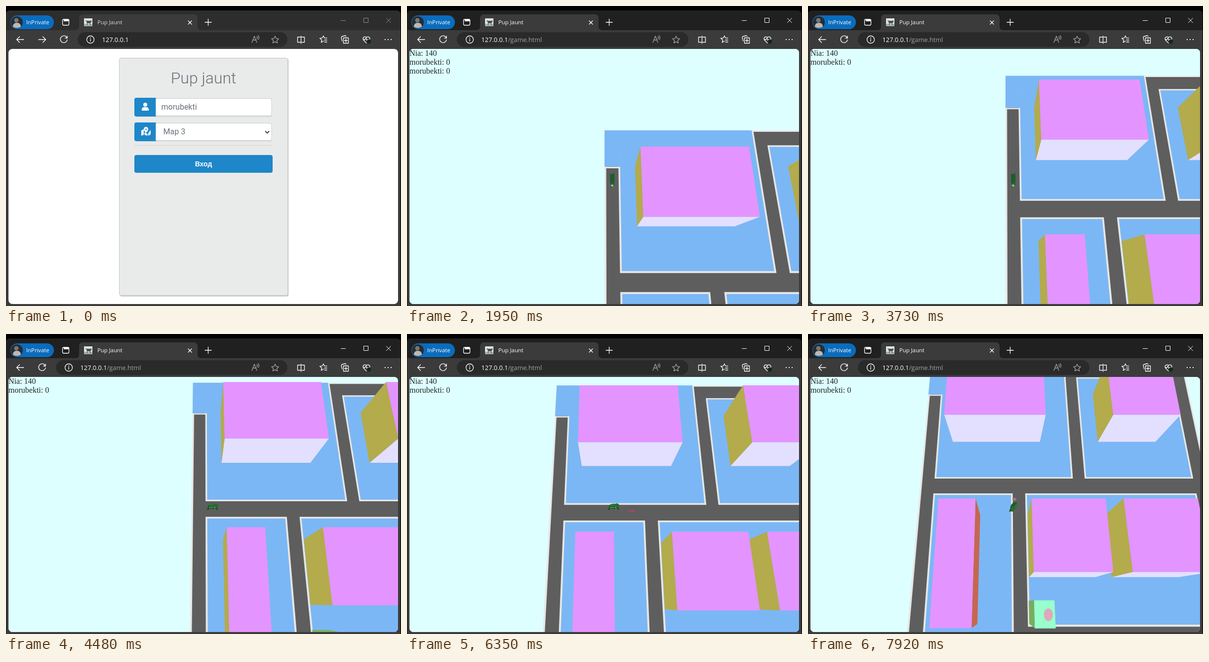
An HTML page with a canvas for the animation above (7.99 s loop, 800 by 608 pixels).

```html
<!DOCTYPE html>
<html lang="en">
<head>
<meta charset="utf-8">
<title>Pup Jaunt</title>
<style>
html, body { margin: 0; width: 100%; height: 100%; overflow: hidden; background: #000; }
#stage { position: relative; width: 800px; height: 608px; overflow: hidden; background: #000; }
svg { position: absolute; left: 0; top: 0; }
#game { position: absolute; left: 5px; top: 87px; border-radius: 8px; }
#score { position: absolute; left: 5px; top: 87px; font: 16px/18px "Liberation Serif", serif; color: #222; }
.ui { font-family: "Open Sans", "Noto Sans", sans-serif; fill: #fff; }
.form { font-family: Roboto, sans-serif; fill: #6a7078; }
.line { fill: none; stroke: #fff; stroke-width: 1.3; stroke-linecap: round; stroke-linejoin: round; }
.dim { stroke: #a3a3a3; }
#frame { fill: #202020; }
#controls { stroke: #fff; stroke-width: 1; fill: none; }
.idle #frame { fill: #2d2d2d; }
.idle #controls { stroke: #8b8b8b; }
.idle #tabText { fill: #dcdcdc; }
#button { fill: #1d87c9; }
.hover #button { fill: #26a9e0; }
</style>
</head>
<body>
<div id="stage">
<svg width="800" height="608" viewBox="0 0 800 608">
  <path id="frame" d="M0 608V17q0-8 8-8H791q8 0 8 8V608Z"/>
  <path d="M1 608V49H140q8 0 8-8V25q0-8 8-8H380q8 0 8 8V41q0 8 8 8H799V608Z" fill="#3b3b3b"/>
  <rect x="9" y="19" width="88" height="28" rx="14" fill="#0a6cbd"/>
  <circle cx="22" cy="33" r="12" fill="#2b2b2b"/>
  <circle cx="21" cy="29" r="4.5" fill="#777"/>
  <path d="M14 42q0-8 8-8t8 8q-8 5-16 0" fill="#b9b9b9"/>
  <text class="ui" x="41" y="37" font-size="11.3">InPrivate</text>
  <rect class="line" x="114.5" y="27" width="13" height="12" rx="2.5"/>
  <path d="M114 27h14v4h-14zM114 31h3v-4h-3z" fill="#fff"/>
  <g id="favicon">
    <rect x="158" y="25" width="17" height="16" fill="#dbe4df"/>
    <path d="M158 36h17v5h-17z" fill="#a5b2a6"/>
    <path d="M161 29l3 1h7l2-1v4l-2 1v5h-1v-4h-5v4h-1v-5z" fill="#49504f"/>
  </g>
  <circle id="spinner" cx="160" cy="35" r="1.5" fill="#3b8fd6"/>
  <text class="ui" id="tabText" x="185" y="37" font-size="11.3"></text>
  <path class="line" stroke-width="1" d="M369 30l7 7m0-7l-7 7M403 33h13m-6.5-6.5v13"/>
  <path id="controls" d="M678 29.5h10M724.5 24.5h9v9h-9zM770 24.5l9.5 9.5m0-9.5l-9.5 9.5"/>

  <path class="line" d="M36 68H21.5m6-6l-6 6 6 6"/>
  <path class="line" id="forward" d="M66 68h14.5m-6-6l6 6-6 6"/>
  <path class="line" id="stop" d="M67.5 62.5l11 11m0-11l-11 11"/>
  <path class="line" id="reload" d="M123.5 64.5a7 7 0 1 0 .5 4M124 61v4h-4"/>
  <rect id="pill" y="53" height="30" rx="15" fill="#2a2a2a"/>
  <g id="site">
    <circle class="line" cx="0" cy="68" r="7.5"/>
    <path class="line" d="M0 67.5v4"/><circle cx="0" cy="64.7" r="1" fill="#fff"/>
    <text class="ui" x="23.5" y="73" font-size="12.8">127.0.0.1<tspan id="path" fill="#a3a3a3">/game.html</tspan></text>
  </g>
  <path class="line dim" d="M498 74l5-13 5 13m-8-5h6M508 62q2 2 0 5M510.5 60q3.5 4 .5 8"/>
  <path class="line dim" d="M545 61l2.2 4.7 5.1.6-3.8 3.5 1 5.1-4.5-2.5-4.5 2.5 1-5.1-3.8-3.5 5.1-.6z"/>
  <path class="line" d="M596 63h-5.5v10.5H596M599 63h5.5v10.5H599M597.5 61v15"/>
  <path class="line" d="M643 71l-4.5 3 1-5-4-3.5 5-.7 2.3-4.3 2.2 4.3h5M645 69h5m-5 4h5"/>
  <path class="line" d="M681 71l-2-7q0-2 2-2.5l6-1.5 2 1.5M683.5 64.5h10v11h-10zM688.5 67v6m-3-3h6"/>
  <path class="line" d="M730 75l-6-6c-3-5 3-9 6-5 3-4 9 0 6 5M724 68h3l2-3 2 5 1-2h3"/>
  <circle cx="735" cy="72" r="4.5" fill="#16281e"/>
  <path d="M767 67h2v2h-2zm6 0h2v2h-2zm6 0h2v2h-2z" fill="#fff"/>

  <rect x="5" y="87" width="789" height="517" rx="8" fill="#fff"/>
  <g id="login">
    <rect x="231" y="107" width="342" height="482" rx="4" fill="#000" opacity=".1"/>
    <rect x="230.5" y="106.5" width="341" height="482" rx="4" fill="#000" opacity=".12"/>
    <rect x="229.5" y="105.5" width="341" height="481" rx="3.5" fill="#e9ebea" stroke="#c3c4c4"/>
    <text class="form" x="400" y="157" font-size="32" font-weight="300" text-anchor="middle">Pup jaunt</text>
    <path d="M264 188h274v37H264zM264 238h274v37H264z" fill="#000" opacity=".06"/>
    <path d="M304 186v38h-40q-4 0-4-4v-30q0-4 4-4zM304 236v38h-40q-4 0-4-4v-30q0-4 4-4z" fill="#1d87c9"/>
    <path d="M303.5 187.5H534q4 0 4 4v27q0 4-4 4H303.5zM303.5 237.5H534q4 0 4 4v27q0 4-4 4H303.5z" fill="#fff" stroke="#c9ccd0"/>
    <circle cx="282" cy="200" r="4" fill="#fff"/>
    <path d="M275 212v-2q0-5 5-5h4q5 0 5 5v2z" fill="#fff"/>
    <path d="M274 252l5-2v11l-5 2zM280.5 256l6 3v4l-6-2zM288 258l5-7v9l-5 3z" fill="#fff"/>
    <path d="M283.5 257q-5-5-4.5-7.5a4.5 4.5 0 0 1 9 0q.5 2.5-4.5 7.5" fill="#fff"/>
    <circle cx="283.5" cy="250" r="1.5" fill="#1d87c9"/>
    <text class="form" x="314.5" y="210" font-size="16">morubekti</text>
    <text class="form" x="318.5" y="260" font-size="16">Map 3</text>
    <path d="M525 253.5l4 4 4-4" fill="none" stroke="#444" stroke-width="2"/>
    <path d="M260 282.5h280" stroke="#d0d2d2"/>
    <rect id="button" x="260" y="302" width="280" height="36" rx="4"/>
    <text x="400" y="325" font-family="Liberation Sans, sans-serif" font-size="14" font-weight="700" fill="#fff" text-anchor="middle">Вход</text>
  </g>
</svg>
<canvas id="game" width="789" height="517"></canvas>
<div id="score"><div>Nia: 140</div><div>morubekti: 0</div><div id="third">morubekti: 0</div></div>
<svg width="800" height="608">
  <path id="cursor" d="M0 0v16l3.7-3.4 2.5 5.8 2.7-1.2-2.5-5.6h5z" fill="#fff" stroke="#000"/>
</svg>
</div>
<script>
const LOOP = 7990, ACTIVE = 620, CLICK = 1340, LOADED = 1620, SCENE = 1950;
const $ = id => document.getElementById(id);
const ctx = $('game').getContext('2d');

// Time, camera right, camera forward, dog heading in degrees
const route = [
  [2470, 0, -40, 90], [2890, 0, 0, 90], [3310, 0, 48, 90], [4140, 0, 143, 90],
  [4210, 3, 146, 30], [4480, 24.4, 153.5, 0], [4750, 31, 165, 40], [4900, 34, 167, 20],
  [5030, 36, 166, -20], [5660, 50.6, 146.2, -10], [5870, 66, 146, -4], [6630, 136, 146, 0],
  [6980, 159.5, 159.9, -8], [7450, 193.5, 170, 60], [7920, 176.2, 203.3, 128]
];
const pointer = [[320, 552, 560], [530, 520, 470], [760, 488, 360], [1010, 473.5, 317.5]];

function along(keys, t) {
  if (t <= keys[0][0]) return keys[0].slice(1);
  for (let i = 1; i < keys.length; i++) {
    const a = keys[i - 1], b = keys[i];
    if (t <= b[0]) {
      const k = (t - a[0]) / (b[0] - a[0]);
      return a.slice(1).map((v, j) => v + (b[j + 1] - v) * k);
    }
  }
  return keys[keys.length - 1].slice(1);
}

// Perspective camera looking steeply down, at scale 1 in the middle
const FOCAL = 624, SIN = .9524, COS = .305;
let camX = 0, camZ = 0;

function project(x, z, h = 0) {
  const u = x - camX, v = z - camZ;
  const s = FOCAL / (FOCAL - v * COS - h * SIN);
  return [394.5 + u * s, 258.5 + (v * SIN - h * COS) * s, s];
}

function fill(points, color) {
  ctx.fillStyle = color;
  ctx.beginPath();
  points.forEach(p => ctx.lineTo(p[0], p[1]));
  ctx.fill();
}

function area(p) {
  return p.reduce((sum, a, i) => {
    const b = p[(i + 1) % p.length];
    return sum + a[0] * b[1] - b[0] * a[1];
  }, 0);
}

function ground(x0, x1, z0, z1, color) {
  fill([project(x0, z0), project(x1, z0), project(x1, z1), project(x0, z1)], color);
}

const BLUE = '#7bb7f5', ROAD = '#5e5e5e', KERB = '#e7e7e5', EDGE = 3.5;

function block(x0, x1, z0, z1) {
  ground(x0, x1, z0, z1, KERB);
  ground(x0 + EDGE, x1 - EDGE, z0 + EDGE, z1 - EDGE, BLUE);
}

const house = { top: '#e494ff', left: '#b3ab4c', right: '#c76650', front: '#e3e0ff', back: '#5f584b' };
const hut = { top: '#99ffcc', left: '#78ac62', right: '#78ac62', front: '#a5e8c8', back: '#7ab060' };

function box(x0, x1, z0, z1, h, c) {
  const corners = [[x0, z0], [x1, z0], [x1, z1], [x0, z1]];
  const low = corners.map(p => project(...p));
  const high = corners.map(p => project(...p, h));
  [c.back, c.right, c.front, c.left].forEach((color, i) => {
    const j = (i + 1) % 4, side = [high[i], high[j], low[j], low[i]];
    if (area(side) < 0) fill(side, color);
  });
  fill(high, c.top);
}

function oval(x, y, rx, ry, color) {
  ctx.fillStyle = color;
  ctx.beginPath();
  ctx.ellipse(x, y, rx, ry, 0, 0, 7);
  ctx.fill();
}

function drawDog(t, angle) {
  const down = angle === 90;
  const trot = Math.sin(t / 60);
  ctx.save();
  ctx.translate(down ? 410.5 : t > 6700 ? 411 : 414, down ? 266 : 262.5);
  ctx.rotate(angle * Math.PI / 180);
  if (down) {
    fill([[-14, -4], [-8, -5], [7, -4.5], [8, 4], [-12, 4.5]], '#1f5c2c');
    fill([[5, -5], [11, -5], [12, 1], [6, 3]], '#29692f');
    fill([[9, -2], [13, -2], [13, 2], [9, 2]], '#a9b8ac');
    fill([[13, 0], [16, 1], [15, 3], [12, 3]], '#2f6337');
  } else {
    oval(-1, 0, 9, 5.5, '#1f5c2c');
    oval(6, -1.5, 5, 4.5, '#2a6a34');
    oval(-3, -3, 5, 1.8, '#2f7a3b');
    if (angle < 45) {
      for (const x of [-5, -1, 4]) oval(x + trot, 2, 1.5, 1, '#83b476');
      fill([[-11, 2], [-7, 3], [-8 + trot, 7], [-11 + trot, 7]], '#1b4f28');
      fill([[6, 2], [9, 2], [10 - trot, 7], [7 - trot, 7]], '#1b4f28');
    } else {
      fill([[9, -2], [13, -1], [13, 1], [8, 2]], '#1b4f28');
    }
  }
  ctx.restore();
}

function drawScene(t) {
  const pose = along(route, t);
  [camX, camZ] = pose;
  ctx.fillStyle = '#deffff';
  ctx.fillRect(0, 0, 789, 517);

  ground(.5, 597, -143.2, 620, KERB);
  ground(4, 593.5, -139.7, 616, ROAD);
  ground(29, 317, -143.2, 146.7, KERB);
  ground(32.5, 313.5, -143.2, 143.2, BLUE);
  ground(.5, 31.5, -61, -57.5, KERB);
  ground(.5, 33, -143.2, -61, BLUE);
  block(341.5, 567.5, -108.5, 146.7);
  block(29, 191.5, 179.5, 616);
  block(217, 568, 179.5, 434);

  if (t >= 5030 && t < 7450) {
    const [x, y] = project(165, 160);
    const w = 6 + 11 * Math.abs(Math.sin((t - 5660) / 840));
    oval(x, y, w / 2, w / 6, '#96505e');
  }

  box(376.5, 501.5, -62, 60.8, 101, house);
  box(63, 251.2, -62, 60.8, 101, house);
  box(376.5, 502, 225, 347, 101, house);
  box(221, 346, 225, 347, 101, house);
  box(63, 126, 225, 429.3, 101, house);
  box(219.5, 250, 389.6, 429, 110, hut);
  const [x, y, s] = project(240, 410, 110);
  oval(x, y, 6.7 * s, 9.5 * s, '#dda9bd');

  if (t >= 7450) oval(413, 248, 4, 3, '#a8707c');
  drawDog(t, pose[2]);
}

const show = (id, on) => { $(id).style.display = on ? '' : 'none'; };

function drawPage(t) {
  const moved = t >= CLICK, loading = moved && t < LOADED;
  $('stage').className = (t < ACTIVE ? 'idle ' : '') + (t >= 900 ? 'hover' : '');
  $('tabText').textContent = loading ? '127.0.0.1/game.html' : 'Pup Jaunt';
  show('favicon', !loading);
  show('spinner', loading);
  show('stop', loading);
  show('forward', !moved);
  show('reload', !loading);
  show('path', moved);
  show('login', t < LOADED);
  show('game', t >= SCENE);
  show('score', t >= SCENE);
  show('third', t < 3380);
  show('cursor', t >= 320 && t < LOADED);
  const shift = moved ? -44 : 0;
  $('reload').setAttribute('transform', `translate(${shift})`);
  $('site').setAttribute('transform', `translate(${171 + shift})`);
  $('pill').setAttribute('x', 145 + shift);
  $('pill').setAttribute('width', 425 - shift);
  const turn = (t - 1410) / 70;
  $('spinner').setAttribute('transform', `rotate(${turn * 50} 167 33)`);
  $('cursor').setAttribute('transform', `translate(${along(pointer, t)})`);
}

const start = performance.now();
function tick() {
  const t = (performance.now() - start) % LOOP;
  drawPage(t);
  if (t >= SCENE) drawScene(t);
  requestAnimationFrame(tick);
}
tick();
</script>
</body>
</html>
```
